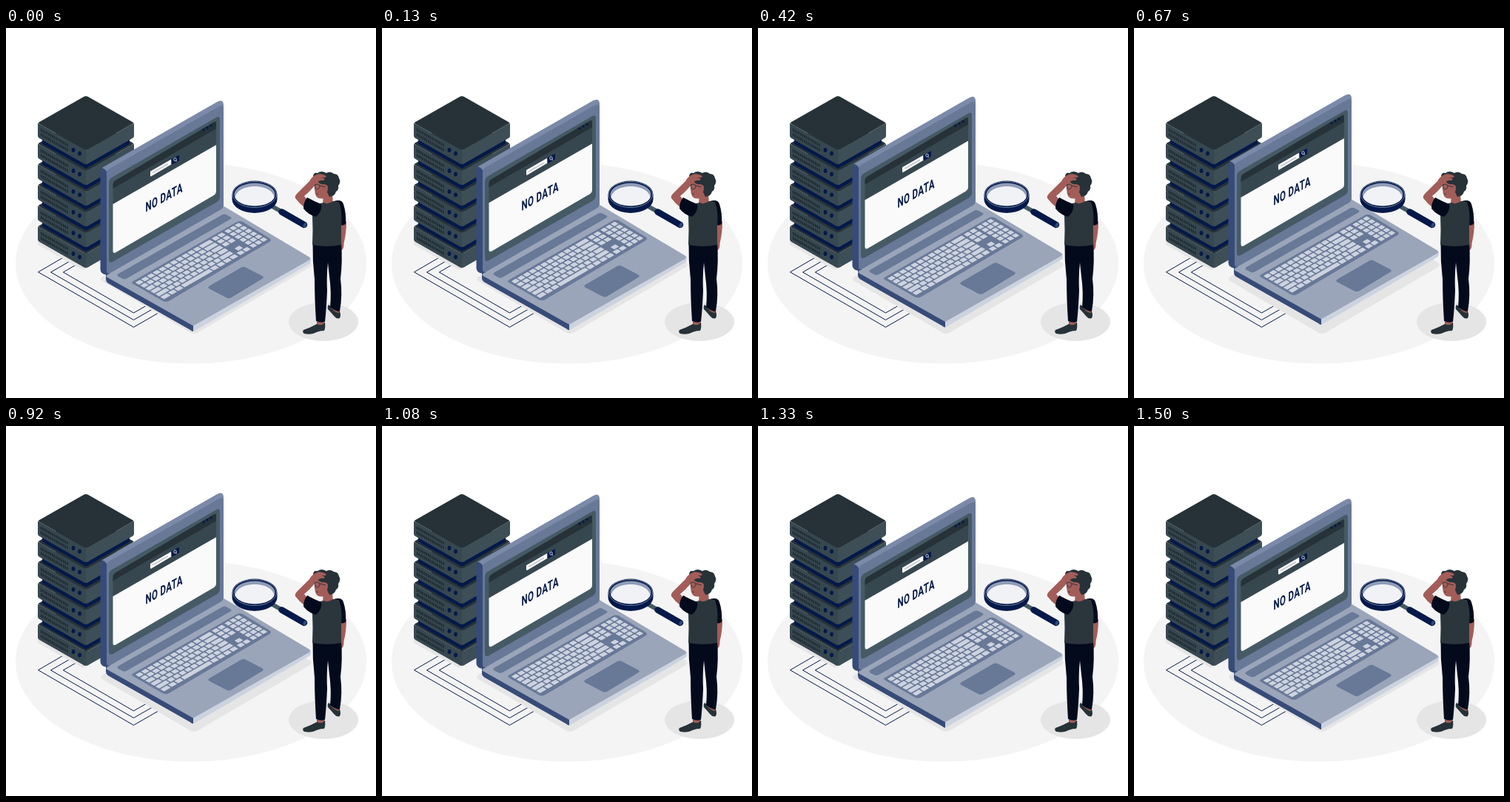
Animation, 500 px wide and 500 px high, one loop 1540 ms. Source, as an HTML page:

```html
<!DOCTYPE html>
<html lang="en">
<head>
<meta charset="utf-8">
<title>No data</title>
<style>
  html, body { margin: 0; height: 100%; overflow: hidden; background: #fff; }
  svg { display: block; width: 100vw; height: 100vh; }
  .top { fill: #263238; }
  .slate { fill: #37474f; }
  .steel { fill: #455a64; }
  .navy { fill: #04194a; }
  .ink { fill: #020a1c; }
  .skin { fill: #a25d58; }
  .bezel { fill: #687897; }
  .deck { fill: #9aa5b9; }
  .side { fill: #364b78; }
  .pale { fill: #ccd3df; }
  .wire { fill: none; stroke: #04194a; }
</style>
</head>
<body>
<svg viewBox="0 0 500 500">
  <defs>
    <path id="spacer" class="navy" d="M49 146L108 179L167 146V156.500L108 190L49 156.500z"/>
    <g id="server">
      <path class="slate" d="M43 128Q43 129 46 130L103 162.500Q105 164 108 164V184Q105 184 103 182L46 149.500Q43 148 43 146z"/>
      <path fill="#3d4e56" d="M173 128Q173 129 170 130L113 162.500Q111 164 108 164V184Q111 184 113 182L170 149.500Q173 148 173 146z"/>
      <path class="top" d="M104 93.500Q108 90.500 112 93.500L170 126.500Q174 128 170 130L112 163Q108 165.500 104 163L46 130Q42 128 46 126.500z"/>
      <g transform="matrix(1 .57 0 1 47 135.5)" fill="none" stroke="#1d282e" stroke-width="4">
        <path d="M0 2H37M0 8.500H37" stroke-dasharray="1.5 1"/>
      </g>
      <ellipse class="navy" cx="91" cy="165" rx="2.400" ry="2.900"/>
      <ellipse class="navy" cx="99.500" cy="169.500" rx="2.400" ry="2.900"/>
    </g>
  </defs>

  <ellipse cx="250" cy="318" rx="237" ry="135.500" fill="#f4f4f4"/>
  <ellipse cx="429" cy="397" rx="47" ry="26" fill="#e5e5e5"/>
  <path class="wire" d="M81 308L43.500 329.800L172.500 404.300L212 381.500M90 313L60.500 330L172.500 394.500L203 377M98 318L77.300 330L172.500 385L196 371.500"/>
  <path fill="#e5e5e5" d="M130 336Q126 339 130 342L248 411Q254 415 260 411L411 323Q414 320 411 317L290 250z"/>
  <path fill="#e5e5e5" d="M43 288V293L104 327L112 323z"/>
  <g id="servers"></g>

  <g id="laptop">
    <!-- base -->
    <path class="side" d="M135 332L253 401V410Q251 410 249 408L138 345Q135 343 135 340z"/>
    <path class="pale" d="M253 401L411 310Q413 314 411 318L256 408.500Q254 410 253 410z"/>
    <path class="deck" d="M135 336L141 328L293 240L409 309Q413 311.500 409 314L253 402.500L137 337z"/>
    <path class="bezel" d="M152 332Q149 334 152 336L158 339Q161 340 164 338L303 258.500Q306 256.500 303 255L297 252Q295 251 292 252.500z"/>
    <path class="bezel" d="M172 342Q168 344 172 346L212 369Q216 371 220 369L356 289Q360 286.500 356 284L320 262Q316 260 312 262z"/>
    <g id="keys" class="pale" transform="matrix(.866 -.5 .866 .5 169.500 344)"></g>
    <path class="bezel" d="M275 348.500Q271.500 350.500 275 352.500L298 364.500Q301 366 304 364.500L346 339Q349.500 337 346 335L324 323.500Q321 322 318 323.500z"/>

    <!-- lid -->
    <path class="side" d="M127.500 195Q127.500 190 131 188L140 191V332Q134 335 129.500 331Q127.500 329 127.500 326z"/>
    <path fill="#7b8aa8" d="M129.500 189L285 100Q293 95.500 294 103V120L137 197Q136 191 129.500 189z"/>
    <path class="bezel" d="M136 197Q136 192 140 190L288 106Q294 103 294 109V239Q294 243 290 245.500L141 331Q136 333 136 328z"/>
    <path class="steel" d="M139 209Q139 205 143 202L284 121Q289 118 289 124V228Q289 232 285 235L144 316Q139 318 139 313z"/>
    <path class="slate" d="M144.500 212Q144.500 208 148 206L281 129Q284 127 284 131V158L144.500 238z"/>
    <path class="top" d="M144.500 212Q144.500 208 148 206L281 127Q284 125 284 129V136L144.500 217z"/>
    <path fill="#fafafa" d="M144.500 238L284 158V221Q284 224 281 226L148 303.500Q144.500 305 144.500 301z"/>
    <g class="navy">
      <circle cx="267" cy="137.500" r="1.700"/>
      <circle cx="272" cy="134.700" r="1.700"/>
      <circle cx="277" cy="131.900" r="1.700"/>
    </g>
    <g transform="translate(0 1.2)">
      <path fill="#fff" d="M195 192.500L222 177Q223.500 176 223.500 178V183L196.500 199Q195 200 195 198z"/>
      <path d="M198 194.500L219 182.500" stroke="#c9ccd1" stroke-width="2"/>
      <path class="navy" d="M223.500 176L232.500 171Q234 170 234 172V178L225 183Q223.500 184 223.500 182z"/>
      <g fill="none" stroke="#fff" stroke-width=".8">
        <ellipse cx="228.500" cy="176.500" rx="1.700" ry="2.100"/>
        <path d="M229.600 178L231 179"/>
      </g>
    </g>
    <text class="navy" transform="matrix(.64 -.355 0 1 188.500 249)" font-family="Roboto, sans-serif" font-weight="600" font-size="18" letter-spacing=".6">NO DATA</text>
  </g>

  <!-- magnifying glass -->
  <path d="M358 240L372 248" stroke="#455a64" stroke-width="6"/>
  <path d="M372.500 248.500L403 266" stroke="#04194a" stroke-width="8.500" stroke-linecap="round"/>
  <ellipse cx="404" cy="266.500" rx="2" ry="3.200" fill="#364b78" transform="rotate(25 404 266)"/>
  <path class="navy" d="M305.500 225A30.500 18.500 0 0 1 366.500 225V231.500A30.500 18.500 0 0 1 305.500 231.500z"/>
  <ellipse cx="336" cy="225" rx="27.500" ry="15.500" fill="#8f9cb7"/>
  <path fill="#f1f2f5" d="M309.500 229C313 209 359 209 362.500 229C356 244 316 244 309.500 229z"/>
  <ellipse cx="336" cy="225" rx="29.500" ry="17.500" fill="none" stroke="#8492ae" stroke-width=".8"/>

  <!-- man -->
  <path class="skin" d="M452 260L460 261Q460 277 456.500 291Q457 298 453 301L451 290z"/>
  <path class="top" d="M436 374L443 380L451 383Q453 388 451 392Q447 394 443 389Q438 383 435 380Q434 376 436 374z"/>
  <path class="top" d="M420 397L431 398Q432 405 430 409Q424 409 420 411Q413 415 403 413Q400 411 402 408Q411 405 420 400z"/>
  <path class="skin" d="M421 394H430V399Q426 403 420 400zM439 373L450 379V385Q445 385 439 378z"/>
  <path class="ink" d="M414.500 290H453Q455 315 452 339Q455 361 451 383Q445 383 438 377Q440 357 437 336L435 317Q433 337 434 355Q433 379 431 397Q425 399 419 396Q417 366 417 340Q414 315 414.500 290z"/>
  <path class="skin" d="M429 226L441 224L442 238Q434 243 428 237z"/>
  <path class="ink" d="M443 234Q454 231 456 238Q460 250 459 265Q454 268 449 265z"/>
  <path fill="#2a363c" d="M420 238L429 236Q435 239 442 234L450 235Q455 250 453 266V293Q434 297 414 293Q415 272 414 253z"/>
  <path class="skin" d="M414 203L420 209Q413 219 403 227L409 235L404 243Q396 237 391 230Q390 227 393 224z"/>
  <path class="ink" d="M407 229Q416 234 426 238Q428 247 419 255Q409 253 402 244Q402 235 407 229z"/>
  <path class="skin" d="M418 206Q415 217 419 227Q422 232 431 230L440 223L438 206z"/>
  <path class="top" d="M415 201Q415 195 421 196Q426 192 433 196Q438 193 443 197Q449 197 450 203Q453 208 449 213Q450 219 446 221Q444 228 437 228L434 222Q436 215 431 211Q425 212 422 208z"/>
  <path class="skin" d="M411 205Q415 199 423 197Q432 198 433 201Q431 203 426 202Q432 203 430 206Q424 205 419 210Q414 212 411 209z"/>
  <ellipse cx="432" cy="216" rx="3" ry="4" class="skin"/>
  <path d="M417 212Q422 210 424 213Q424 218 420 218Q417 217 417 212M424 213L432 215" fill="none" stroke="#263238" stroke-width=".9"/>
  <path d="M418 224L422 224.500" stroke="#6f3938"/>
</svg>
<script>
  const byId = id => document.getElementById(id);

  // Stack from the bottom up so that each unit covers the one below
  let stack = '';
  for (let i = 5; i >= 0; i--) {
    if (i < 5) stack += `<use href="#spacer" y="${28 * i}"/>`;
    stack += `<use href="#server" y="${28 * i}"/>`;
  }
  byId('servers').innerHTML = stack;

  const key = (x, row, width) =>
    `<rect x="${x}" y="${3 + row * 7.8}" width="${width}" height="6" rx=".8"/>`;
  const run = (x, row, count, pitch) =>
    Array.from({ length: count }, (_, i) => key(x + i * pitch, row, pitch - 1.7)).join('');

  let keys = '';
  for (let row = 0; row < 6; row++) {
    const indent = [9, 9, 12, 14, 18, 12][row];
    keys += key(3, row, indent - 1.7);
    if (row < 5) {
      const count = Math.floor((105 - indent) / 9);
      const end = 3 + indent + count * 9;
      keys += run(3 + indent, row, count, 9) + key(end, row, 119 - end);
    } else {
      keys += run(15, row, 2, 10) + key(35, row, 44) + run(80.5, row, 4, 10);
    }
    if (row < 3 || row === 5) keys += run(122, row, 2, 9);
    if (row === 4) keys += key(126.5, row, 7.5);
    keys += run(142, row, 3, 8);
  }
  byId('keys').innerHTML = keys;

  const LOOP = 1540, FLOAT = 1500, RISE = 10, FPS = 24;

  function draw(now) {
    const frame = Math.floor((now % LOOP + 4.9) * FPS / 1000);
    const phase = frame * 1000 / FPS / FLOAT % 1;
    const lift = RISE * (1 - Math.abs(1 - 2 * phase));
    byId('laptop').setAttribute('transform', `translate(0 ${-lift})`);
    requestAnimationFrame(draw);
  }
  draw(0);
</script>
</body>
</html>
```
